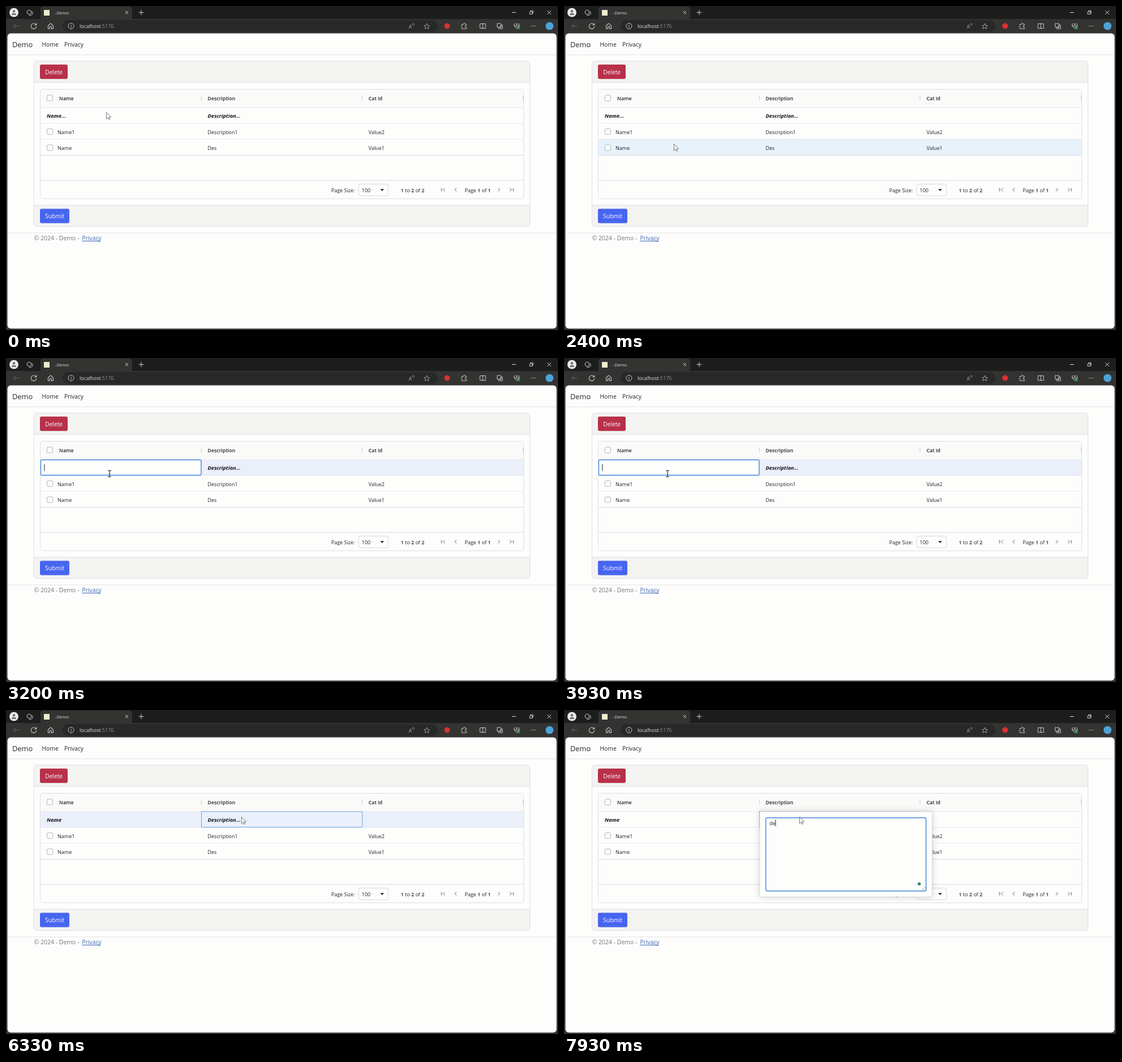
These frames come from a looping animation (976x574 px, 8000 ms). An HTML page with a canvas:

```html
<!DOCTYPE html>
<html lang="en">
<head>
<meta charset="utf-8">
<title>Demo</title>
<style>
  html, body { margin: 0; width: 100%; height: 100%; overflow: hidden; background: #fdfdfd; }
  canvas { display: block; width: 976px; height: 574px; }
</style>
</head>
<body>
<canvas id="stage"></canvas>
<script>
const W = 976, H = 574, LOOP = 8000, STEP = 1000 / 15;
const canvas = document.getElementById('stage');
const ctx = canvas.getContext('2d');
const ratio = window.devicePixelRatio || 1;
canvas.width = W * ratio;
canvas.height = H * ratio;

const FONT = '"Open Sans", "Noto Sans", sans-serif';
const INK = '#20232c', LINE = '#dddfe6', ICON = '#c9c9c9';
const PAPER = '#fdfdfc', BAND = '#f3f3f2', CHROME = '#333332';

// Pointer path: time, x, y
const PATH = [
  [0, 177, 188], [1200, 177, 188], [1530, 190, 455], [1730, 192, 465], [1930, 203, 503],
  [2130, 197, 257], [2333, 197, 257], [2400, 194, 244], [2600, 178, 207], [2933, 178, 207],
  [3000, 183, 205], [5933, 183, 205], [6267, 416, 189], [LOOP, 416, 189]
];
const EDIT = 3000, COMMIT = 6330, POPUP = 6600;
const NAME_KEYS = [4070, 4270, 4400, 4530];
const DESC_KEYS = [7470, 7930];

function pointerAt(t) {
  const i = Math.max(1, PATH.findIndex(p => p[0] >= t));
  const [t0, x0, y0] = PATH[i - 1], [t1, x1, y1] = PATH[i];
  const k = (t - t0) / (t1 - t0);
  return { x: x0 + (x1 - x0) * k, y: y0 + (y1 - y0) * k };
}

const typed = (word, keys, t) => word.slice(0, keys.filter(k => k <= t).length);

function caretOn(t, start, keys) {
  const last = Math.max(start, ...keys.filter(k => k <= t));
  return Math.floor((t - last) / 530) % 2 === 0;
}

function text(str, x, y, size = 9, color = INK, style = '400') {
  ctx.font = `${style} ${size}px ${FONT}`;
  ctx.fillStyle = color;
  ctx.fillText(str, x, y);
  return x + ctx.measureText(str).width;
}

function run(x, y, parts) {
  parts.forEach((part, i) => { x = text(part, x, y, 9, INK, i % 2 ? '600' : '400'); });
}

function rect(x, y, w, h, color) {
  ctx.fillStyle = color;
  ctx.fillRect(x, y, w, h);
}

function box(x, y, w, h, r, fill, stroke, width = 1) {
  ctx.beginPath();
  ctx.roundRect(x, y, w, h, r);
  if (fill) { ctx.fillStyle = fill; ctx.fill(); }
  if (stroke) { ctx.strokeStyle = stroke; ctx.lineWidth = width; ctx.stroke(); }
}

function path(d, color, x = 0, y = 0, width = 1, fill = null) {
  const p = new Path2D(d);
  ctx.save();
  ctx.translate(x, y);
  if (fill) { ctx.fillStyle = fill; ctx.fill(p); }
  if (color) { ctx.strokeStyle = color; ctx.lineWidth = width; ctx.stroke(p); }
  ctx.restore();
}

function disc(x, y, r, fill, stroke) {
  ctx.beginPath();
  ctx.arc(x, y, r, 0, Math.PI * 2);
  if (fill) { ctx.fillStyle = fill; ctx.fill(); }
  if (stroke) { ctx.strokeStyle = stroke; ctx.lineWidth = 1; ctx.stroke(); }
}

function drawTabBar() {
  rect(0, 0, W, H, CHROME);
  rect(0, 0, W, 23, '#1d1d1d');
  box(61, 1, 162, 28, 5, CHROME);
  rect(0, 23, W, 26, CHROME);
  disc(14, 11.5, 8, '#e9e9e9');
  disc(14, 9.3, 2.2, '#77736f');
  path('M-4 4.5Q-4 1 0 1Q4 1 4 4.5Z', null, 14, 11.5, 1, '#77736f');
  path('M-4.5-2.5L-1-4.5L2.5-2.5V1.5L-1 3.5L-4.5 1.5ZM-1.5 5L1 5.3L5 3V-1L3.5-2', ICON, 42, 11.5);
  rect(67, 7, 10, 10, '#efedcf');
  text('- Demo', 85, 14.5, 7.7, '#e2e2e2');
  path('M-2.6-2.6L2.6 2.6M2.6-2.6L-2.6 2.6', '#dedede', 213.5, 11.5);
  path('M-4.5 0H4.5M0-4.5V4.5', '#cfcfcf', 239, 11.5);
  path('M-3.5 0H3.5', '#dedede', 898, 11.5);
  path('M-3-1.5H1.5V3H-3ZM-1.5-1.5V-3H3V1.5H1.5', '#dedede', 929, 11.5, .9);
  path('M-3.2-3.2L3.2 3.2M3.2-3.2L-3.2 3.2', '#dedede', 960.5, 11.5);
}

function drawToolbar() {
  path('M5 0H-5M-1-4L-5 0L-1 4', '#686868', 18.5, 35.5);
  path('M4.3-2A4.8 4.8 0 1 0 4.8 1M4.8-5V-1.7H1.5', ICON, 49, 35.5, 1.1);
  path('M-4.5-.5L0-4.8L4.5-.5V4.8H1.5V1H-1.5V4.8H-4.5Z', ICON, 79, 35.5, 1.1);
  box(100, 25, 663, 21, 10, '#282828');
  disc(115, 35.5, 5, null, ICON);
  path('M0-.8V2.8M0-2.8V-1.8', ICON, 115, 35.5);
  const end = text('localhost', 130, 39, 9, '#e4e4e4');
  text(':5176', end, 39, 9, '#969696');
  text('A', 712, 39.5, 9, '#a9a9a9');
  path('M0-3Q1.5-1.5 0 0M2.5-4Q4.5-1.5 2.5 1', '#a9a9a9', 718, 34, .8);
  path('M0-5L1.5-1.6L5-1.4L2.3 .9L3.2 4.4L0 2.5L-3.2 4.4L-2.3 .9L-5-1.4L-1.5-1.6Z', '#aaa', 744, 36, .9);
  disc(780, 35.5, 5, '#d5332b');
  path('M-4-3H-1Q-1-5.3 .5-5.3Q2-5.3 2-3H4V-.8Q1.5-1 1.5 .8Q1.5 2.3 4 2V4.8H-4V2Q-5.5 .8-4-.8Z', ICON, 810, 35.5);
  path('M-5-4H5V4H-5ZM0-5V5', ICON, 843, 35.5);
  path('M-4.5-4.5H2V2H-4.5ZM-2 2V4.8H4.8V-2H2M1.5-.5V3.5M-.5 1.5H3.5', ICON, 873, 35.5);
  path('M0 4.5L-4.5 0Q-5.5-4-2.5-4.2Q-.8-4 0-2.5Q.8-4 2.5-4.2Q5.5-4 4.5 0ZM-4.5 0H-1.5L0-2L1 1L2 0H4.5', ICON, 903, 35.5);
  disc(906, 38.5, 2.6, '#3b9a55');
  [-3.5, 0, 3.5].forEach(dx => disc(932.5 + dx, 35.5, .8, '#d0d0d0'));
  disc(961, 35.5, 7, '#4da3dc');
}

function checkbox(y) {
  box(72.5, y - 5, 10, 10, 2, PAPER, '#b2b4b8');
}

function button(label, y, w, color) {
  box(60, y, w, 25.5, 3, color);
  text(label, 69, y + 17, 10.3, '#fafaff');
}

function drawPage() {
  box(2.5, 48.5, 971, 523, 6, PAPER);
  text('Demo', 11, 73, 12.8, '#25272c');
  text('Home', 63.5, 72, 10.3);
  text('Privacy', 103, 72, 10.3);
  rect(3, 86, 970, 1, '#e3e3ea');
  box(49.5, 97.5, 877, 293, 4, PAPER, LINE);
  rect(50, 98, 876, 37, BAND);
  rect(50, 353, 876, 37, BAND);
  rect(50, 135, 876, 1, LINE);
  rect(50, 352.5, 876, 1, LINE);
  button('Delete', 103.7, 49, '#b83049');
  button('Submit', 359.3, 52, '#4865f0');
  rect(3, 401.5, 970, 1, '#e4e4e8');
  text('© 2024 - Demo -', 49.5, 415, 10.5, '#70757d');
  text('Privacy', 134.5, 415, 10.3, '#3f6cb8');
  rect(134.5, 416, 33, 1, '#3f6cb8');
}

function drawGrid(t, pointer) {
  const pinnedHover = t >= EDIT && t < POPUP;
  box(60.5, 147.5, 855, 194, 5, PAPER);
  box(61, 148, 854, 32, [5, 5, 0, 0], '#fafaf8');
  if (pinnedHover) rect(61, 180, 854, 28, '#ebeff9');
  [208, 236].forEach(y => {
    const hovered = t < EDIT && pointer.y > y && pointer.y < y + 28;
    if (hovered) rect(61, y, 854, 28, '#e7f2fa');
  });
  [180, 208, 236].forEach(y => rect(61, y - .5, 854, 1, '#e6e7ed'));
  [264, 308.5].forEach(y => rect(61, y, 854, 1, '#d8dae0'));
  box(60.5, 147.5, 855, 194, 5, null, LINE);
  [345, 629, 914].forEach(x => rect(x, 159, 1, 9, '#c9cbd0'));

  [163, 222.5, 251].forEach(checkbox);
  [['Name', 94], ['Description', 356.5], ['Cat Id', 641]].forEach(([s, x]) => text(s, x, 167, 8.8, INK, '600'));
  [['Name1', 'Description1', 'Value2'], ['Name', 'Des', 'Value1']].forEach((row, r) =>
    row.forEach((s, c) => text(s, [91, 356.5, 641][c], 226.5 + r * 28.3)));

  const pinned = 'italic 700';
  text(t >= COMMIT ? 'Name' : 'Name...', 72, 198, 9.3, '#14151b', pinned);
  if (t >= COMMIT) box(345.5, 180, 284.5, 27.5, 0, '#eaf0fb', '#69a5df');
  text('Description...', 356.5, 198, 9.3, '#14151b', pinned);
  if (t >= EDIT && t < COMMIT) drawNameEditor(t);
  drawPager();
}

function caret(x, y) {
  rect(x, y, 1, 12, '#222');
}

function focusBox(x, y, w, h) {
  box(x, y, w, h, 3, null, '#c4dcf5', 3);
  box(x, y, w, h, 2, PAPER, '#5590da', 1.4);
}

function drawNameEditor(t) {
  focusBox(61.5, 180.5, 283.5, 27);
  const end = text(typed('Name', NAME_KEYS, t), 67.5, 197.5);
  if (caretOn(t, 2870, NAME_KEYS)) caret(end, 188);
}

function drawPager() {
  text('Page Size:', 575, 329.5);
  box(623.5, 315.5, 52.5, 20.5, 3, PAPER, '#d3d6da');
  text('100', 629, 329.5);
  path('M-3.3-1.8H3.3L0 2Z', null, 665, 326, 1, '#222');
  run(698, 329.5, ['', '1', ' to ', '2', ' of ', '2']);
  run(811, 329.5, ['Page ', '1', ' of ', '1']);
  const icon = '#55585f';
  path('M-3-3V3M3-3L0 0L3 3', icon, 773, 325.5);
  path('M1.5-3L-1.5 0L1.5 3', icon, 795, 325.5);
  path('M-1.5-3L1.5 0L-1.5 3', icon, 871.5, 325.5);
  path('M3-3V3M-3-3L0 0L-3 3', icon, 894, 325.5);
}

function drawPopup(t) {
  ctx.save();
  ctx.shadowColor = 'rgba(40,40,70,.22)';
  ctx.shadowBlur = 11 * ratio;
  box(346, 180, 305, 151, 3, PAPER);
  ctx.restore();
  box(346, 180, 305, 151, 3, null, '#d6d8de');
  focusBox(357, 191, 283, 129.5);
  const end = text(typed('de', DESC_KEYS, t), 363, 203.5);
  if (caretOn(t, 6660, DESC_KEYS)) caret(end, 194);
  disc(628, 308, 2.8, '#35806c');
  path('M-4 2L2-4M0 2L2 0', '#99978a', 637, 317, .9);
}

function drawPointer(t, { x, y }) {
  if (t >= 3200 && t < COMMIT && x < 345) {
    path('M-3-5.5H-1L0-5L1-5.5H3M0-5V5M-3 5.5H-1L0 5L1 5.5H3', '#1c1c1c', x, y, 1.2);
  } else {
    path('M0 0V11.7L2.7 9.2L4.6 13L6.2 12.2L4.4 8.5H8.2Z', '#66666c', x + .5, y + .5, .9, PAPER);
  }
}

function draw(now) {
  const t = Math.floor(((now % LOOP) + 4) / STEP) * STEP;
  const time = Math.min(t, LOOP - 1);
  const pointer = pointerAt(time);
  ctx.setTransform(ratio, 0, 0, ratio, 0, 0);
  drawTabBar();
  drawToolbar();
  drawPage();
  drawGrid(time, pointer);
  if (time >= POPUP) drawPopup(time);
  drawPointer(time, pointer);
}

const start = performance.now();
function frame() {
  draw(performance.now() - start);
  requestAnimationFrame(frame);
}
frame();
</script>
</body>
</html>
```
